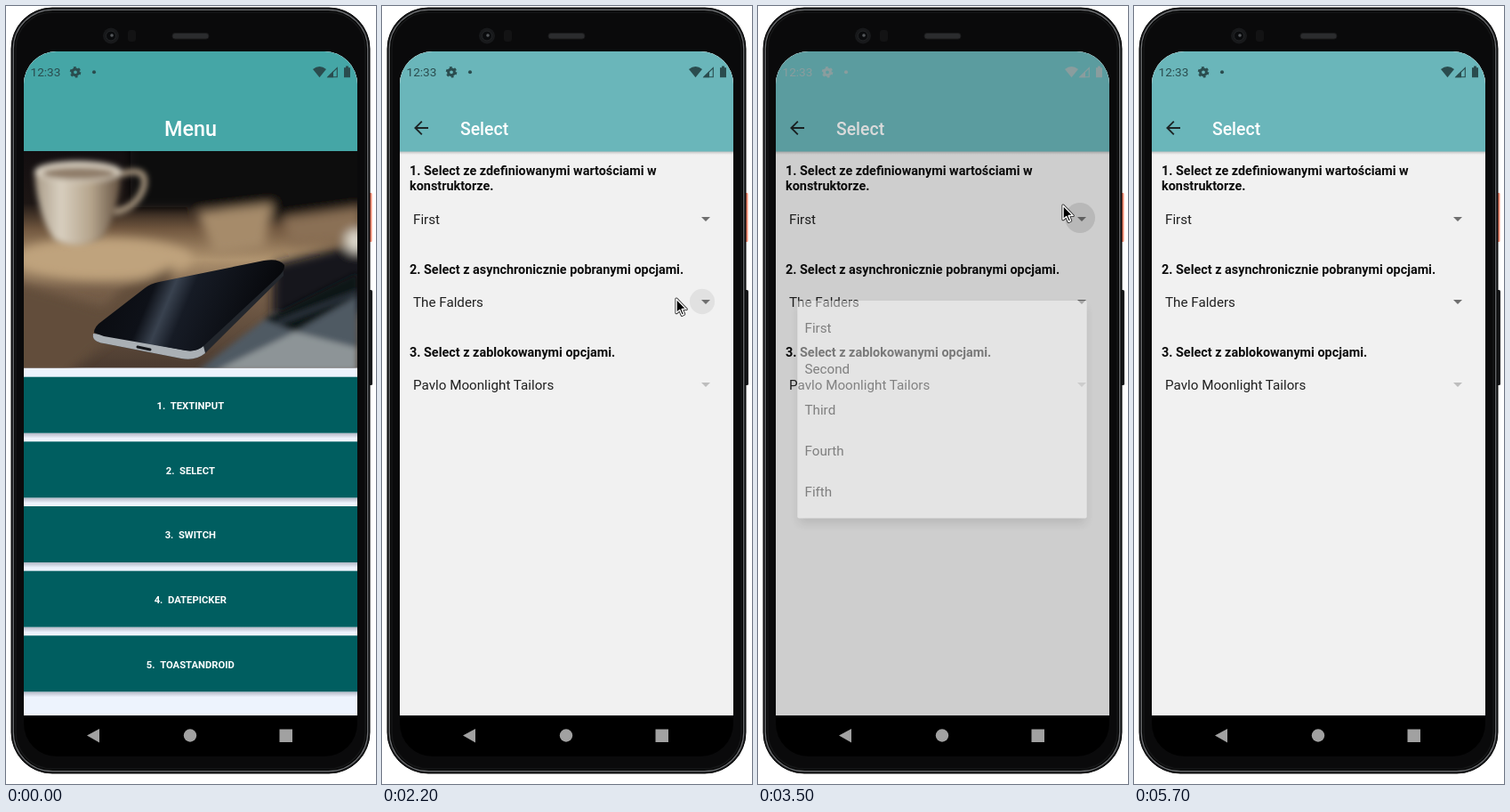
Animation of 416x874 px, one loop 5800 ms. Source, as an HTML page:

```html
<!DOCTYPE html>
<html lang="pl">
<head>
<meta charset="utf-8">
<title>Select demo</title>
<style>
html, body { margin: 0; width: 100%; height: 100%; overflow: hidden; background: #fff; }
svg { display: block; width: 100vw; height: 100vh; font-family: Roboto, "Noto Sans", sans-serif; }
.head { font-weight: 700; font-size: 14.4px; fill: #0c0c0c; }
.value { font-size: 15.2px; fill: #202020; }
.btn { font-weight: 700; font-size: 11.25px; fill: #fff; text-anchor: middle; white-space: pre; }
</style>
</head>
<body>
<svg viewBox="0 0 416 874">
  <defs>
    <clipPath id="screen"><path d="M20 797V88a37 37 0 0 1 37-37H358a37 37 0 0 1 37 37V797Z"/></clipPath>
    <clipPath id="photoClip"><path d="M20 163H395V406.500H20Z"/></clipPath>
    <filter id="soft" x="-20%" y="-20%" width="140%" height="140%"><feGaussianBlur stdDeviation="6"/></filter>
    <filter id="mild" x="-20%" y="-20%" width="140%" height="140%"><feGaussianBlur stdDeviation="3"/></filter>
    <filter id="shade" x="-20%" y="-20%" width="140%" height="150%"><feGaussianBlur stdDeviation="6"/></filter>
    <linearGradient id="cup">
      <stop offset="0" stop-color="#a89a87"/><stop offset=".3" stop-color="#d8cfbf"/>
      <stop offset=".65" stop-color="#b5a48c"/><stop offset="1" stop-color="#5f4d3d"/>
    </linearGradient>
    <linearGradient id="wood" x2="0" y2="1">
      <stop offset="0" stop-color="#120e10"/><stop offset=".24" stop-color="#1d1614"/>
      <stop offset=".36" stop-color="#71573f"/><stop offset=".5" stop-color="#b09470"/>
      <stop offset=".64" stop-color="#78604a"/><stop offset="1" stop-color="#4b3b30"/>
    </linearGradient>
    <linearGradient id="glass" x2="1" y2=".2">
      <stop offset="0" stop-color="#08090d"/><stop offset=".36" stop-color="#0e1118"/>
      <stop offset=".46" stop-color="#39424f"/><stop offset=".56" stop-color="#161b25"/>
      <stop offset="1" stop-color="#06070a"/>
    </linearGradient>
    <linearGradient id="under" x2="0" y2="1">
      <stop offset="0" stop-color="#b3b7c5"/><stop offset="1" stop-color="#edf3fd"/>
    </linearGradient>
    <linearGradient id="fall" x2="0" y2="1">
      <stop offset="0" stop-color="#000" stop-opacity=".22"/><stop offset="1" stop-color="#000" stop-opacity="0"/>
    </linearGradient>
    <linearGradient id="orange">
      <stop offset="0" stop-color="#e0593f"/><stop offset="1" stop-color="#ff9a80"/>
    </linearGradient>
    <path id="arrow" d="M-5-2.400H5L0 2.500Z"/>
    <path id="pointer" d="M0 0V15.800L3.700 12.500L6.200 18.300L8.700 17.200L6.200 11.600H11.200Z"/>
  </defs>

  <!-- phone body -->
  <rect x="407" y="210" width="4.500" height="55" rx="1" fill="url(#orange)"/>
  <rect x="406" y="319" width="6" height="107" rx="1.500" fill="#1b1c1e"/>
  <rect x="6" y="2" width="403" height="860" rx="46" fill="#17181a" stroke="#050505"/>
  <rect x="8.300" y="4.300" width="398.400" height="855.400" rx="44" fill="#060606" stroke="#6c6e71" stroke-width="1.200"/>
  <rect x="11" y="7" width="393" height="850" rx="41" fill="#0a0a0b" stroke="#161718" stroke-width="1.500"/>
  <circle cx="118" cy="33.500" r="9" fill="#18191b"/>
  <circle cx="118" cy="33.500" r="5.500" fill="#0a0b0d" stroke="#232527"/>
  <circle cx="119" cy="33" r="1.800" fill="#55585c"/>
  <rect x="137" y="27" width="9" height="13" rx="3" fill="#131314"/>
  <rect x="187" y="30.500" width="41" height="6.500" rx="3" fill="#2b2c2e" stroke="#1a1a1b"/>
  <path d="M20 797H395V806a37 37 0 0 1-37 37H57a37 37 0 0 1-37-37Z" fill="#000"/>
  <g fill="#a1a1a1">
    <path d="M91 819.500L105 812V827.500Z"/>
    <circle cx="207" cy="819.500" r="7.200"/>
    <rect x="307.500" y="812.500" width="14.500" height="14.500"/>
  </g>

  <g clip-path="url(#screen)">
    <rect x="20" y="51" width="375" height="746" fill="#fbfdff"/>
    <g id="menu">
      <rect x="20" y="51" width="375" height="746" fill="#edf3fd"/>
      <rect x="20" y="51" width="375" height="112" fill="#45a6a6"/>
      <text x="207.500" y="146" font-size="23.400" font-weight="500" fill="#fff" text-anchor="middle">Menu</text>
      <g clip-path="url(#photoClip)">
        <rect x="20" y="163" width="375" height="244" fill="url(#wood)"/>
        <g filter="url(#soft)">
          <path d="M140 140H420V232L330 246L240 226L140 226Z" fill="#09080b"/>
          <path d="M215 232L300 222L290 272L235 280Z" fill="#a68b6b"/>
          <path d="M310 238L400 226V262L320 268Z" fill="#8a7055"/>
          <ellipse cx="110" cy="284" rx="100" ry="24" fill="#bfa37d"/>
          <path d="M10 310L110 340L130 318L190 292L170 345L110 380L60 420H10Z" fill="#624d3b"/>
          <path d="M300 290L410 262V345L300 350Z" fill="#15161a"/>
          <circle cx="394" cy="264" r="13" fill="#dcd7cb"/>
        </g>
        <g filter="url(#mild)">
          <path d="M126 190Q160 178 155 203Q148 226 122 232" fill="none" stroke="#a3927b" stroke-width="7"/>
          <path d="M32 186Q35 236 54 262Q82 276 108 260Q126 236 130 186Z" fill="url(#cup)"/>
          <ellipse cx="81" cy="186" rx="49" ry="12" fill="#d8cfc0"/>
          <ellipse cx="82" cy="188" rx="41" ry="7" fill="#8f7d69"/>
          <path d="M215 410L300 345L395 325V410Z" fill="#4f5a64"/>
          <path d="M235 410L325 366L395 384V410Z" fill="#8d9497"/>
          <path d="M290 352L395 300V326L325 366Z" fill="#0f1217"/>
          <path d="M305 356L395 322" stroke="#39424e" stroke-width="3"/>
        </g>
        <path d="M98 368Q96 377 110 379L197 396Q213 399 224 390L312 303V295L222 377Z" fill="#23272d"/>
        <path d="M98 368Q96 377 110 379L197 396Q213 399 224 390L222 382Q214 389 202 387L108 369Z" fill="#aab0b5"/>
        <path d="M99 367Q99 360 108 354L156 317Q162 312 172 310L290 286Q307 283 313 291Q314 297 306 304L222 382Q214 389 202 387L110 371Z" fill="url(#glass)"/>
        <path d="M148 383L162 386" stroke="#15171b" stroke-width="3" stroke-linecap="round"/>
      </g>
      <g id="buttons"></g>
    </g>

    <g id="page">
      <rect x="20" y="51" width="375" height="746" fill="#f1f1f1"/>
      <rect x="20" y="163" width="375" height="4" fill="url(#fall)"/>
      <rect x="20" y="51" width="375" height="112.500" fill="#6ab6ba"/>
      <path d="M52 137H38M44.800 129.600L37.400 137L44.800 144.400" fill="none" stroke="#1d2526" stroke-width="1.900"/>
      <text x="88" y="144.500" font-size="19.400" font-weight="500" fill="#fff">Select</text>
      <circle id="ripple" fill="#000"/>
      <g class="head">
        <text x="31" y="190">1. Select ze zdefiniowanymi wartościami w</text>
        <text x="31" y="207">konstruktorze.</text>
        <text x="31" y="300.500">2. Select z asynchronicznie pobranymi opcjami.</text>
        <text x="31" y="393.700">3. Select z zablokowanymi opcjami.</text>
      </g>
      <g class="value">
        <text x="35" y="245.300">First</text>
        <text id="band" x="35" y="338.300"></text>
        <text x="35" y="431.300">Pavlo Moonlight Tailors</text>
      </g>
      <use href="#arrow" x="364" y="239.500" fill="#6f6f6f"/>
      <use href="#arrow" x="364" y="332.500" fill="#6f6f6f"/>
      <use href="#arrow" x="364" y="425.500" fill="#bdbdbd"/>
    </g>

    <rect id="dim" x="20" y="51" width="375" height="746"/>
    <g id="popup">
      <rect x="46" y="338" width="322" height="243" fill="#000" opacity=".25" filter="url(#shade)"/>
      <rect x="44.300" y="331" width="325.400" height="244.500" rx="2" fill="#fff"/>
      <g id="items" class="value"></g>
    </g>

    <g id="status">
      <text x="27.500" y="79.300" font-size="13.600">12:33</text>
      <circle cx="78" cy="74.300" r="3.400" fill="none" stroke="currentColor" stroke-width="3"/>
      <circle cx="78" cy="74.300" r="5.300" fill="none" stroke="currentColor" stroke-width="2" stroke-dasharray="2.800 2.750"/>
      <circle cx="99" cy="74.300" r="2"/>
      <path d="M345 71Q352.500 65 360 71L352.500 80.300Z"/>
      <path d="M362 79.700L372.300 69.500V79.700Z" fill="none" stroke="currentColor" stroke-width="1.100"/>
      <path d="M361 80.300L368 73.300V80.300Z"/>
      <path d="M380 69.200H382V67.500H385V69.200H387V80.300H380Z"/>
    </g>
  </g>

  <g id="cursor">
    <use href="#pointer" fill="none" stroke="#111" stroke-width="3" stroke-linejoin="round"/>
    <use href="#pointer" fill="#000" stroke="#fff" stroke-width="1.500" stroke-linejoin="round"/>
  </g>
</svg>
<script>
const LOOP = 5800, STEP = 100;
const $ = id => document.getElementById(id);
const clamp = v => Math.max(0, Math.min(1, v));
const ramp = (t, from, to) => clamp((t - from) / (to - from));
const mix = (a, b, k) => a + (b - a) * k;

const bands = ["The Falders", "Baron", "Six Lamp Harbor Crew", "The Bandelors", "The Fillots"];
const ordinals = ["First", "Second", "Third", "Fourth", "Fifth"];
const labels = ["TEXTINPUT", "SELECT", "SWITCH", "DATEPICKER", "TOASTANDROID"];

// time, x, y of the pointer tip
const path = [
  [200, 396, 620], [600, 262, 528], [900, 248, 516], [1100, 250, 364], [1400, 255, 367],
  [1800, 255, 367], [2000, 331, 329], [2500, 331, 329], [2900, 338, 301], [3000, 338, 301],
  [3400, 343, 224], [3600, 343, 224], [3900, 345, 228], [4100, 345, 228], [4600, 350, 414],
  [4900, 352, 418], [5200, 352, 418], [5400, 386, 434]
];

// opening press, popup fade-in start, fade-out start
const dialogs = [
  { press: 2150, open: 2230, close: 3000, x: 360, y: 332, list: bands },
  { press: 3380, open: 3430, close: 4080, x: 362, y: 238, list: ordinals }
];

$("buttons").innerHTML = labels.map((label, i) => {
  const y = 416.7 + i * 72.65;
  return `<rect x="20" y="${y + 63}" width="375" height="6" fill="url(#under)"/>
    <rect x="20" y="${y}" width="375" height="63" fill="#005e60"/>
    <text class="btn" x="207.300" y="${y + 36.3}">${i + 1}.\u00a0\u00a0${label}</text>`;
}).join("");

$("items").innerHTML = ordinals.map((_, i) =>
  `<text x="52.500" y="${367.3 + i * 45.85}"></text>`).join("");
const rows = [...$("items").children];

function zoom(el, scale, opacity) {
  el.setAttribute("transform", `translate(207.5 424) scale(${scale}) translate(-207.5 -424)`);
  el.setAttribute("opacity", opacity);
}

function moveCursor(t) {
  const last = path.length - 1;
  const shown = t >= path[0][0] && t <= path[last][0];
  $("cursor").setAttribute("visibility", shown ? "visible" : "hidden");
  if (!shown) return;
  const i = Math.max(1, path.findIndex(p => p[0] >= t));
  const [a, b] = [path[i - 1], path[i]];
  const k = ramp(t, a[0], b[0]), e = k * k * (3 - 2 * k);
  $("cursor").setAttribute("transform", `translate(${mix(a[1], b[1], e)} ${mix(a[2], b[2], e)})`);
}

function drawDialog(t) {
  const d = t < 3300 ? dialogs[0] : dialogs[1];
  const alpha = ramp(t, d.open, d.open + 155) * (1 - ramp(t, d.close, d.close + 200));
  rows.forEach((row, i) => row.textContent = d.list[i]);
  $("popup").setAttribute("opacity", alpha);
  $("dim").setAttribute("opacity", 0.6 * alpha ** 1.8);

  const grow = ramp(t, d.press, d.press + 70);
  const strength = grow * mix(0.09, 0.11, ramp(t, d.press + 50, d.press + 120));
  const ripple = $("ripple");
  ripple.setAttribute("cx", d.x);
  ripple.setAttribute("cy", d.y);
  ripple.setAttribute("r", mix(7, 17, grow));
  ripple.setAttribute("opacity", strength * (1 - ramp(t, d.press + 200, d.press + 320)));

  const tint = [42, 76, 78].map(c => Math.round(mix(c, 255, alpha)));
  $("status").setAttribute("fill", `rgb(${tint})`);
  $("status").setAttribute("color", `rgb(${tint})`);
}

function render(t) {
  const p = 1 - (1 - ramp(t, 1000, 1220)) ** 3;
  zoom($("menu"), mix(1, 1.1, p), p < 1 ? 1 - 0.9 * p : 0);
  zoom($("page"), mix(0.85, 1, p), p);
  $("band").textContent = t < 1500 ? "None" : bands[0];
  drawDialog(t);
  moveCursor(t);
}

const start = performance.now();
function tick() {
  const t = (performance.now() - start) % LOOP;
  render(Math.floor(t / STEP) * STEP);
  requestAnimationFrame(tick);
}
tick();
</script>
</body>
</html>
```
